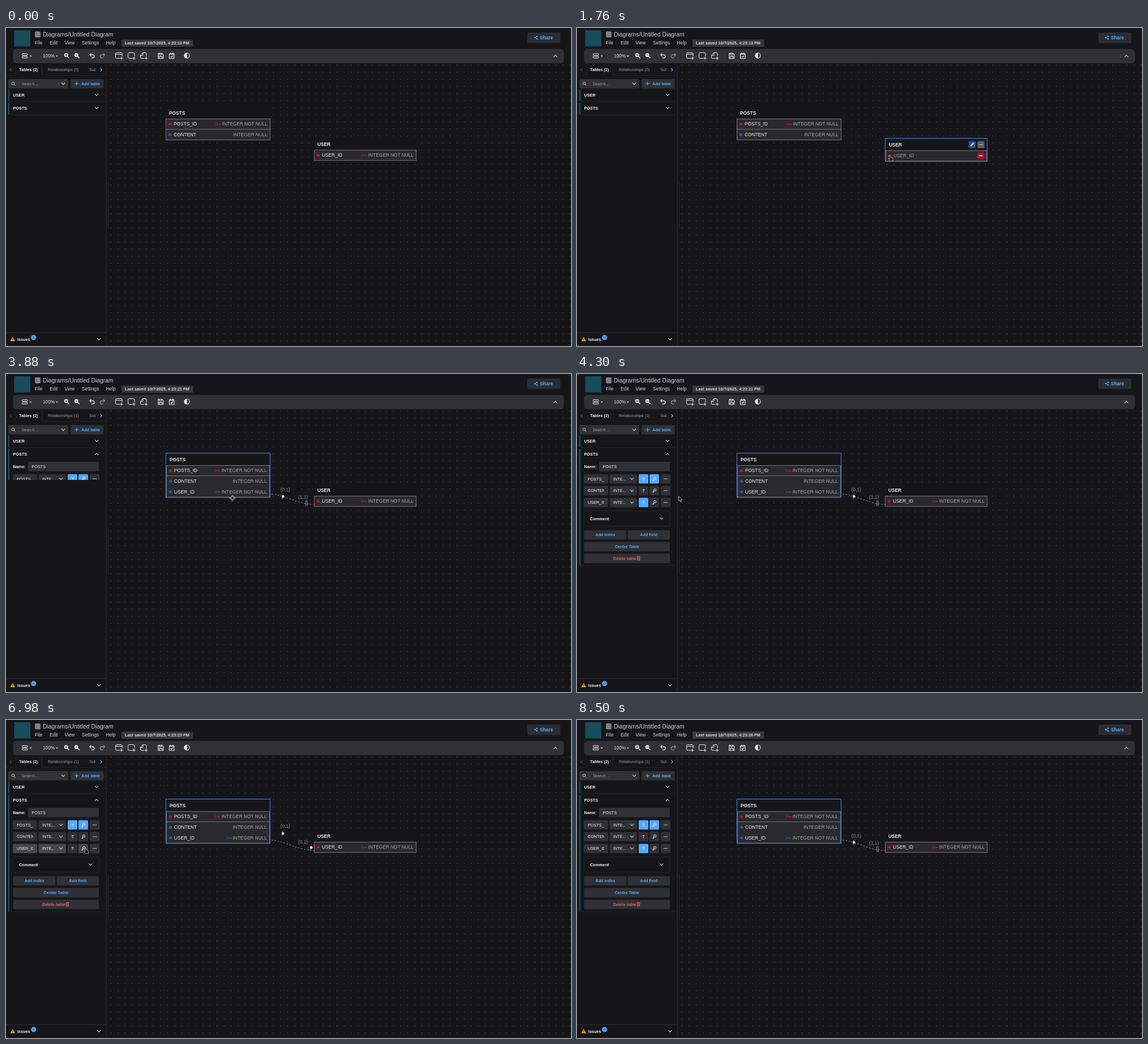
Write an HTML page that moves like this. It is 998 by 561 pixels and loops after 9730 ms.

```html
<!DOCTYPE html>
<html lang="en">
<head>
<meta charset="utf-8">
<title>Diagram editor</title>
<style>
html, body { margin: 0; width: 100%; height: 100%; overflow: hidden; background: #16161a; }
svg { display: block; }
#stage { width: 100%; height: 100%; }
text { font-family: "Liberation Sans", Arial, sans-serif; white-space: pre; }
</style>
</head>
<body>
<svg id="stage" viewBox="0 0 998 561">
  <defs>
    <pattern id="dots" x="179.3" y="59.3" width="12.475" height="12.475" patternUnits="userSpaceOnUse">
      <circle cx="6.24" cy="6.24" r=".6" fill="#6b6d72"/>
    </pattern>
  </defs>
  <rect width="998" height="561" fill="#16161a"/>
  <rect x="183" y="62" width="815" height="498" fill="url(#dots)"/>
  <g id="chrome"></g>
  <g id="scene"></g>
</svg>
<script>
const LOOP = 9730, S = 7.28, M = 8.32;
const BG = '#16161a', FILL = '#2f3136', TEXT = '#f0f0f2', SOFT = '#c9c9cd', MUTED = '#9a9aa0';
const EDGE = '#2a2b30', BLUE = '#54a9ff', TEAL = '#175e7a', RED = '#c1122f', FIELD = '#2e5c93';

const text = (x, cy, str, size = S, fill = TEXT, bold = 0, anchor = 'start') =>
  `<text x="${x}" y="${cy + size * .358}" font-size="${size}" fill="${fill}" font-weight="${bold ? 700 : 400}" text-anchor="${anchor}">${str}</text>`;
const box = (x, y, w, h, fill, r = 0, stroke = 'none', sw = 1) =>
  `<rect x="${x}" y="${y}" width="${w}" height="${h}" rx="${r}" fill="${fill}" stroke="${stroke}" stroke-width="${sw}"/>`;
const line = (d, color = TEXT, w = 1, more = '') =>
  `<path d="${d}" fill="none" stroke="${color}" stroke-width="${w}" stroke-linecap="round" stroke-linejoin="round" ${more}/>`;
const shape = (d, fill, more = '') => `<path d="${d}" fill="${fill}" ${more}/>`;
const dot = (x, y, r, fill, stroke = 'none', sw = 1) =>
  `<circle cx="${x}" cy="${y}" r="${r}" fill="${fill}" stroke="${stroke}" stroke-width="${sw}"/>`;
const at = (x, y, body) => `<g transform="translate(${x} ${y})">${body}</g>`;
const clip = (x, y, w, h, body) => `<svg x="${x}" y="${y}" width="${w}" height="${h}" viewBox="${x} ${y} ${w} ${h}">${body}</svg>`;
const chevron = (x, y, up = 0, color = SOFT) => line(`M${x - 2.7} ${y + (up ? 1.4 : -1.4)}l2.7 ${up ? -2.8 : 2.8}l2.7 ${up ? 2.8 : -2.8}`, color, 1.1);
const caret = (x, y) => shape(`M${x - 2.2} ${y - 1.1}h4.4l-2.2 2.6z`, SOFT);
const ellipsis = (x, y) => [-2.5, 0, 2.5].map(d => dot(x + d, y, .8, TEXT)).join('');
const pencil = (x, y) => shape(`M${x - 3} ${y + 3}l.6-2.3l3.6-3.6l1.7 1.7l-3.6 3.6zM${x + 1.7} ${y - 3.4}l.8-.7l1.7 1.7l-.8.7z`, TEXT);

const zoom = (x, plus) => at(x, 48.5,
  dot(-.8, -.8, 3.4, TEXT) + line('M2 2L4.3 4.3', TEXT, 1.6) +
  line('M-2.4-.8h3.2' + (plus ? 'M-.8-2.4v3.2' : ''), FILL, 1));
const turn = (x, flip, color) => `<g transform="translate(${x} 49) scale(${flip} 1)">` +
  line('M-1.8-4.2L-4.2-1.8L-1.8.6M-4-1.8H1.2a2.8 2.8 0 0 1 0 5.6H-1', color, 1.2) + '</g>';
const plus = (x, y) => line(`M${x - 2.3} ${y}h4.6M${x} ${y - 2.3}v4.6`, TEXT, 1.1);

function chrome() {
  let s = box(14.5, 4, 28.5, 28.5, '#174c5c');
  s += box(51, 6, 10, 10.5, '#85868b', 2) + line('M52 9.3h8M52 12.8h8', '#606166', .6);
  s += text(65, 11, 'Diagrams/Untitled Diagram', 10.4, '#d0d0d4');
  [[51, 'File'], [77, 'Edit'], [103.5, 'View'], [134, 'Settings'], [176.5, 'Help']]
    .forEach(([x, label]) => s += text(x, 26.5, label, M, '#d4d4d8'));
  s += box(204, 20.5, 126.5, 12.5, '#36383d', 1.6);
  s += box(921, 8, 58, 18.5, '#2b2d32', 2) + text(943, 17, 'Share', M, BLUE, 1);
  s += line('M937.8 15l-3.6 2l3.6 2', BLUE, .9) + [[934, 17], [938, 14.7], [938, 19.3]].map(p => dot(...p, 1.3, BLUE)).join('');

  s += box(12.5, 37, 973, 25, FILL, 5.5);
  s += box(28.5, 45.3, 9.5, 3, 'none', 1, TEXT) + box(28.5, 50, 9.5, 3, 'none', 1, TEXT) + caret(43.8, 49.5);
  s += text(65, 49, '100%', M, '#dedee2') + caret(89.8, 49.5);
  s += zoom(107, 1) + zoom(125, 0) + turn(152, 1, TEXT) + turn(170.3, -1, MUTED);
  s += line('M201 53.5h-5.5a2 2 0 0 1-2-2v-6a2 2 0 0 1 2-2h7.5a2 2 0 0 1 2 2v4M193.5 46.4h11.5') + plus(204, 53.3);
  s += line('M223 53.5h-5.5a2 2 0 0 1-2-2v-6a2 2 0 0 1 2-2h7.5a2 2 0 0 1 2 2v4') + plus(226, 53.3);
  s += line('M244 53.5h-5a1.5 1.5 0 0 1-1.5-1.5v-3.8l4.5-4.7h4a2 2 0 0 1 2 2v4M237.5 48.5h3.5a1 1 0 0 0 1-1v-4') + plus(247.5, 53.3);
  s += line('M268.8 44.5h6.4l2.6 2.6v6.6h-9zM270.8 44.5v2.8h3.6v-2.8M270.8 53.7v-3.6h5v3.6', TEXT, 1.1);
  s += line('M288.5 45.5h8.5v8.2h-8.5zM288.5 46.3h8.5M290.5 43.9v1.4M295 43.9v1.4M290.8 50.2l1.5 1.5l2.6-2.7', TEXT, 1.1);
  s += dot(319.5, 48.6, 4.6, 'none', TEXT, 1.1) + shape('M319.5 44a4.6 4.6 0 0 0 0 9.2z', TEXT) + chevron(970.5, 49.2, 1);

  s += box(0, 63, 177, 498, BG) + line('M177.2 64V561', EDGE) + line('M180.6 273V353', '#2c2d32');
  s += line('M0 83.5H17V65.5M63.5 65.5V83.5H177', '#232429');
  s += line('M9.6 71.2L7 73.8l2.6 2.6', '#6c6d72') + line('M166.7 71.2l2.6 2.6l-2.6 2.6', BLUE, 1.3);
  s += text(23, 73.7, 'Tables (2)', S, TEXT, 1) + clip(147, 66, 11.5, 14, text(147, 73.7, 'Subject Areas', S, MUTED));
  s += box(4, 90, 106, 16.5, '#323235', 1.6) + dot(12.5, 97.8, 2.3, 'none', SOFT) + line('M14.3 99.6l1.8 1.8', SOFT);
  s += text(27.5, 98.2, 'Search...', S, MUTED) + chevron(101, 98.4);
  s += box(114, 90, 58.5, 16.5, FILL, 1.6) + line('M121.7 98.3h6M124.7 95.3v6', BLUE, 1.2) + text(133, 98.2, 'Add table', S, BLUE, 1);
  s += box(4, 108.5, 1.8, 20.5, TEAL) + line('M6 129.8H173', '#222328');
  s += text(12.5, 118, 'USER', S, TEXT, 1) + chevron(160, 118) + text(12.5, 141.3, 'POSTS', S, TEXT, 1);
  s += line('M0 537.5H177', EDGE) + shape('M11.8 545.2l4.2 7.2h-8.4z', '#f0b52b') + line('M11.8 547.8v2M11.8 551.2v.1', BG, .9);
  s += text(20, 549, 'Issues', S, TEXT, 1) + dot(48.7, 546, 4.5, BLUE) + text(48.7, 546, '0', 6.2, '#17324e', 0, 'middle') + chevron(164.3, 549);
  return s;
}

const key = (x, y, color) => line(`M${x + 4.3} ${y}H${x + 9}v1.3M${x + 7.2} ${y}v1.2`, color, 1) +
  box(x + .5, y - 1.8, 3.8, 3.8, 'none', 1.7, color, 1);

// row: [name, type, red key, blue key]
function table(x, y, w, name, rows, { selected, hover, row = -1, dim = -1, split }) {
  const o = selected ? 1 : 0, top = y + 20.7 + o, right = x + w - o, h = rows.length * 18.7;
  let s = box(x, y, w, 21 + h, BG);
  s += box(x + .5 + o, top + .4, w - 1 - 2 * o, h - .4, '#2a2a2e', 0, '#77777b');
  if (split) s += line(`M${x + 1} ${top + 18.7 * split}H${right}`, '#77777b');
  if (selected) s += box(x + .5, y + .3, w - 1, h + 22, 'none', 0, '#3c6fd0', 1.3);
  s += text(x + 6 + o, y + 10.5 + o, name, M, '#e8e8ea', 1);
  if (hover) {
    const by = y + 10.5 + o;
    s += box(right - 32.3, by - 6.3, 12.6, 12.6, '#28528f', 1.6) + pencil(right - 26.2, by);
    s += box(right - 16.8, by - 6.3, 12.6, 12.6, '#5c5c60', 1.6) + ellipsis(right - 10.5, by);
  }
  rows.forEach(([label, type, pk, fk], i) => {
    const cy = top + 9.5 + 18.7 * i, faded = i === row || i === dim;
    s += dot(x + 7.5 + o, cy, 2.6, pk ? RED : FIELD) + text(x + 14 + o, cy, label, M, faded ? '#a1a1aa' : '#e8e8ea');
    if (i === row) {
      s += box(right - 17, cy - 6.2, 12.6, 12.6, '#a8122b', 1.6) + line(`M${right - 13.5} ${cy}h5.6`, TEXT, 1.3);
      return;
    }
    const start = right - 5 - (type === 'INTEGER NULL' ? 60.6 : 80.4);
    s += text(right - 5, cy, type, M, '#a1a1aa', 0, 'end');
    if (fk) s += key(start - 12, cy, FIELD);
    if (pk) s += key(start - (fk ? 24 : 12), cy, RED);
  });
  return s;
}

function relation({ solid, stale, optional }) {
  const y = solid ? 193.5 : 212, high = solid || stale, my = high ? 200.3 : 216, ly = high ? 187.5 : 204;
  const ry = high ? 215.5 : 217, bar = high ? 226.5 : 228, gray = '#8c8c90';
  let s = line(`M467.5 ${y}C490 ${y} 515 230 544 230`, gray, 1, solid ? '' : 'stroke-dasharray="2.2 3.2" stroke-dashoffset="-2"');
  s += text(493.3, ly, '(0,1)', M, gray, 0, 'middle') + text(524.5, ry, optional ? '(0,1)' : '(1,1)', M, gray, 0, 'middle');
  s += line(`M488 ${my - 4}v8`, gray) + dot(489.3, my, 2.2, '#f0f0f0');
  s += optional ? line(`M538.3 ${bar - 4.5}v8`, gray) + dot(539.3, bar - 1.5, 2.2, '#f0f0f0')
    : line(`M529.7 ${bar - 4.8}v9.6M532 ${bar - 4.8}v9.6`, gray);
  return s;
}

const wrench = (x, y) => line(`M${x - 2.6} ${y + 2.8}l2.2-2.6M${x - 2.6} ${y + 2.8}l1.4.2v-1.2`, TEXT, 1) + dot(x + 1, y - 1.2, 2, 'none', TEXT, 1);

function panel(open, rows, hot, pos) {
  if (!open) return box(4, 132, 1.8, 20.5, TEAL) + line('M6 153.2H173', '#222328') + chevron(160, 141.3);
  const button = (x, y, w, label, color) => box(x, y, w, 16.5, FILL, 1.6) + text(x + w / 2, y + 8.2, label, S, color, 1, 'middle');
  let s = box(4, 132, 1.8, 206, TEAL) + line('M6 338.2H173', '#222328') + chevron(160, 141.3, 1);
  s += text(12.5, 163.2, 'Name:', S, TEXT, 1) + box(39, 155, 125, 16.5, FILL, 1.6) + text(45.5, 163.2, 'POSTS');
  rows.forEach(([name, need, pk], i) => {
    const y = 185 + 20.8 * i, live = hot && i === 2, base = live ? '#45474c' : FILL;
    const over = x => live && pos[0] >= x && pos[0] < x + 17;
    const square = (x, on) => box(x, y - 8.2, 17, 16.5, on ? (over(x) ? '#7fc1ff' : BLUE) : over(x) ? '#45474c' : FILL, 1.6);
    s += box(12, y - 8.2, 43, 16.5, base, 1.6) + clip(19, y - 6, 29, 13, text(19, y, name));
    s += box(57.5, y - 8.2, 48.5, 16.5, base, 1.6) + text(64, y, 'INTE...') + chevron(97, y);
    s += square(109, need) + text(117.6, y, '?', S, TEXT, 1, 'middle');
    s += square(128, pk) + wrench(136.6, y) + square(148, 0) + ellipsis(156.5, y);
  });
  s += box(12.5, 241.5, 151.5, 27, 'none', 2, '#25262b') + text(23, 255, 'Comment', S, TEXT, 1) + chevron(149.3, 255);
  s += button(12.5, 275.5, 75, 'Add index', BLUE) + button(89.5, 275.5, 74.5, 'Add field', BLUE);
  s += button(12.5, 296.2, 151.5, 'Center Table', BLUE) + box(12.5, 317, 151.5, 16.5, FILL, 1.6);
  s += text(64, 325.2, 'Delete table', S, '#f0605a', 1);
  return s + line('M105.6 322.8h6M107.2 322.6v-.9h2.8v.9M106.4 323v5.4h4.4v-5.4M107.9 324.6v2.4M109.3 324.6v2.4', '#f0605a', .9);
}

const cursors = {
  arrow: shape('M0 0v9l2-1.9l1.5 3.5l1.5-.7l-1.5-3.3h2.7z', '#111', 'stroke="#ddd" stroke-width=".7"'),
  hand: shape('M-1.2.4q1-1 1.8.2l.6 3l3.6 1.1q1 .5.8 1.8l-.7 3.7h-4.6l-3-3.6q.2-1.4 1.9-.2z', '#111', 'stroke="#ddd" stroke-width=".7"'),
  move: dot(0, 0, 2.7, '#111', '#ddd', 1) + line('M-1.3-4.1L0-5l1.3.9M-1.3 4.1L0 5l1.3-.9M-4.1-1.3L-5 0l.9 1.3M4.1-1.3L5 0l-.9 1.3', '#ddd', .9)
};

// start, end, destination
const moves = [
  [330, 590, 652, 382], [780, 1000, 572, 246], [1170, 1680, 552.5, 224.5], [1930, 2320, 410, 201],
  [3050, 3560, 400, 219], [3960, 4350, 169, 215], [4540, 4970, 140.5, 225.5], [7270, 7650, 119, 228], [8100, 8350, 362, 295]
];
function pointer(t) {
  let x = 877, y = 474;
  for (const [a, b, nx, ny] of moves) {
    const u = Math.min(1, Math.max(0, (t - a) / (b - a))), e = u * u * (3 - 2 * u);
    x += (nx - x) * e;
    y += (ny - y) * e;
  }
  return [+x.toFixed(2), +y.toFixed(2)];
}

function scene(t) {
  const pos = pointer(t), [x, y] = pos;
  const linked = t >= 2600, open = t >= 3840, linking = t >= 1930 && !linked;
  const pk = t >= 5140 && t < 6980, loose = t >= 6980 && t < 7820;
  const onUser = t >= 1170 && t < 2600 && x > 544 && x < 725 && y > 194 && y < 236;
  const onPosts = t >= 1930 && t < 3960 && x < 467;
  const onField = open && x > 11 && x < 166 && y > 217 && y < 237;
  const stamp = t < 2640 ? 13 : t < 5180 ? 21 : t < 7060 ? 23 : t < 7860 ? 25 : 26;

  let s = text(210, 26.8, `Last saved 10/7/2025, 4:23:${stamp} PM`, S, '#dcdce0', 1);
  s += text(74, 73.7, `Relationships (${+linked})`, S, MUTED);
  const fields = [['POSTS_ID', 1, 1], ['CONTENT', 0, 0], ['USER_ID', !loose, pk]];
  const body = panel(open, fields, onField, pos);
  s += open ? clip(0, 131, 177, 22 + 186 * Math.min(1, (t - 3840) / 220), body) : body;

  if (linked) s += relation({ solid: pk, stale: t >= 6980 && t < 7040, optional: loose });
  const rows = [['POSTS_ID', 'INTEGER NOT NULL', 1], ['CONTENT', 'INTEGER NULL']];
  if (linked) rows.splice(pk ? 1 : 2, 0, ['USER_ID', loose ? 'INTEGER NULL' : 'INTEGER NOT NULL', pk, 1]);
  s += table(282, 139.3, 185, 'POSTS', rows, {
    selected: open, hover: onPosts && !open, row: linked && !open && y < 216 ? 2 : -1, split: pk ? 2 : 1
  });
  s += table(544, 194.3, 181, 'USER', [['USER_ID', 'INTEGER NOT NULL', 1]], {
    selected: t >= 1720 && !open, hover: onUser, row: onUser && y > 215 ? 0 : -1, dim: linking ? 0 : -1
  });
  if (linking) s += line(`M552 225.5L${x} ${y}`, '#e01020', 1, 'stroke-dasharray="4.2 4.2"');

  if (t >= 330 && t < 8500) {
    const kind = onField && x > 109 || onUser && x < 556 ? 'hand' : onUser || linking || linked && t < 3960 ? 'move' : 'arrow';
    s += at(x, y, cursors[kind]);
  }
  return s;
}

document.getElementById('chrome').innerHTML = chrome();
const layer = document.getElementById('scene');
let last = '', began;
function tick(now) {
  began ??= now;
  const s = scene((now - began) % LOOP);
  if (s !== last) layer.innerHTML = last = s;
  requestAnimationFrame(tick);
}
requestAnimationFrame(tick);
</script>
</body>
</html>
```
